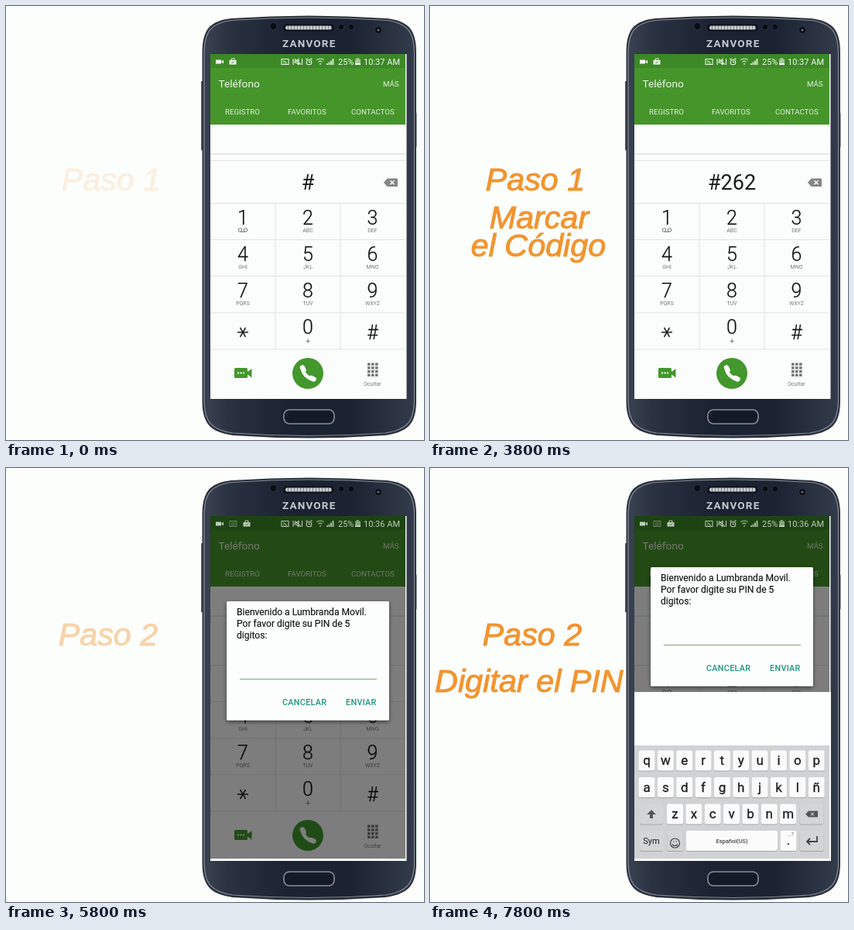
Animation of 540x560 px, one loop 8000 ms. Source, as an HTML page:

```html
<!DOCTYPE html>
<html lang="es">
<head>
<meta charset="utf-8">
<title>Marcar el código</title>
<style>
html, body { margin: 0; width: 100%; height: 100%; overflow: hidden; background: #fcfefc; }
svg { display: block; width: 100vw; height: 100vh; font-family: Roboto, sans-serif; }
.mid { text-anchor: middle; }
.end { text-anchor: end; }
.step { font: italic 41.3px "Liberation Sans", Arial, sans-serif; fill: #f2942f; stroke: #f2942f; stroke-width: 1; text-anchor: middle; }
.number { font-size: 27px; fill: #1c1c1c; text-anchor: middle; }
.tab { font-size: 9.7px; fill: #e3f1dd; }
.grid { stroke: #dfe3e2; }
.digit { font-size: 25px; font-weight: 300; fill: #111; stroke: #111; stroke-width: .25; text-anchor: middle; }
.hint { font-size: 7px; fill: #777; text-anchor: middle; }
.status { font-size: 11px; fill: #f4f8f2; }
.message { font-size: 12.1px; fill: #111; stroke: #111; stroke-width: .15; }
.action { font-size: 10.8px; font-weight: 500; letter-spacing: .3px; fill: #1d9580; }
.key { font-size: 17px; fill: #1c1c1c; stroke: #1c1c1c; stroke-width: .3; text-anchor: middle; }

/* Everything advances on a 200 ms grid; the small lead keeps clear of its edges. */
.a { animation: 8s step-end -50ms infinite; }
.paso1 { animation-name: paso1; }
.marcar { animation-name: marcar; }
.paso2 { animation-name: paso2; }
.digitar { animation-name: digitar; }
.n1 { animation-name: n1; }
.n2 { animation-name: n2; }
.n3 { animation-name: n3; }
.n4 { animation-name: n4; }
.dialing { animation-name: dialing; }
.after { animation-name: after; }
.sliding { animation-name: sliding; }
.dim { animation-name: dim; }
.shift { animation-name: shift; }
.fade { animation-name: fade; }
.running { animation-name: running; }
.pin { animation-name: pin; }
.bag { animation-name: bag; }
.field { animation-name: field; }
.band { animation-name: band; }
.keyboard { animation-name: keyboard; }
.spin { animation-name: spin; animation-timing-function: steps(40); transform-origin: 318px 292px; }

@keyframes paso1 { 0% { opacity: .14; animation-timing-function: steps(6) } 15% { opacity: 1 } 50% { opacity: .5 } 52.5%, 100% { opacity: 0 } }
@keyframes marcar { 0% { opacity: 0 } 15% { opacity: 0; animation-timing-function: steps(7) } 32.5% { opacity: 1 } 50% { opacity: .5 } 52.5%, 100% { opacity: 0 } }
@keyframes paso2 { 0% { opacity: 0 } 67.5% { opacity: 0; animation-timing-function: steps(5) } 80%, 100% { opacity: 1 } }
@keyframes digitar { 0% { opacity: 0 } 77.5% { opacity: 0; animation-timing-function: steps(7) } 95%, 100% { opacity: 1 } }
@keyframes n1 { 0% { opacity: 1 } 5%, 100% { opacity: 0 } }
@keyframes n2 { 0% { opacity: 0 } 5% { opacity: 1 } 12.5%, 100% { opacity: 0 } }
@keyframes n3 { 0% { opacity: 0 } 12.5% { opacity: 1 } 37.5%, 100% { opacity: 0 } }
@keyframes n4 { 0% { opacity: 0 } 37.5% { opacity: 1 } 52.5%, 100% { opacity: 0 } }
@keyframes dialing { 0% { opacity: 1 } 52.5%, 100% { opacity: 0 } }
@keyframes after { 0% { opacity: 0 } 52.5%, 100% { opacity: 1 } }
@keyframes sliding { 0% { opacity: 0 } 52.5% { opacity: 1 } 57.5%, 100% { opacity: 0 } }
@keyframes dim { 0% { opacity: 0 } 57.5% { opacity: .33 } 72.5%, 100% { opacity: .5 } }
@keyframes shift { 0% { transform: none } 52.5% { transform: translateX(1.8px) } 72.5%, 100% { transform: none } }
@keyframes fade { 0% { opacity: 1 } 72.5%, 100% { opacity: .75 } }
@keyframes running { 0% { opacity: 0 } 57.5% { opacity: 1 } 72.5%, 100% { opacity: 0 } }
@keyframes pin { 0% { opacity: 0; transform: none } 72.5% { opacity: 1; transform: none } 92.5%, 100% { opacity: 1; transform: translateY(-44px) } }
@keyframes bag { 0% { transform: none } 72.5%, 100% { transform: translateX(18px) } }
@keyframes field { 0% { opacity: 0 } 72.5%, 100% { opacity: 1 } }
@keyframes band { 0% { opacity: 0 } 92.5%, 100% { opacity: 1 } }
@keyframes keyboard { 0% { transform: translateY(152px) } 87.5% { transform: translateY(60px) } 90%, 100% { transform: none } }
@keyframes spin { to { transform: rotate(1800deg) } }
</style>
</head>
<body>
<svg viewBox="0 0 540 560">
  <defs>
    <linearGradient id="shell">
      <stop stop-color="#3a4352"/><stop offset=".12" stop-color="#2a3242"/><stop offset=".4" stop-color="#1b2231"/>
      <stop offset=".7" stop-color="#1b2231"/><stop offset="1" stop-color="#333c4b"/>
    </linearGradient>
    <pattern id="mesh" width="4" height="4" patternUnits="userSpaceOnUse">
      <rect width="4" height="4" fill="#c9ccd0"/><path d="M0 0V4" stroke="#5b5f68" stroke-width="1.4"/>
    </pattern>
    <filter id="shadow" x="-10%" y="-10%" width="120%" height="130%">
      <feDropShadow dx="0" dy="2" stdDeviation="2.5" flood-opacity=".55"/>
    </filter>
    <clipPath id="screen"><rect x="264" y="62" width="253.5" height="445"/></clipPath>
  </defs>

  <g class="a paso1"><text class="step" x="136" y="238">Paso 1</text></g>
  <g class="a marcar">
    <text class="step" x="141" y="287">Marcar</text>
    <text class="step" x="140" y="323">el Código</text>
  </g>
  <g class="a paso2"><text class="step" x="132" y="229">Paso 2</text></g>

  <g id="phone">
    <path d="M253 97V186M529.5 138V182" stroke="#4d535f" stroke-width="2"/>
    <path d="M254.5 60C254.5 31 264 20 291 17Q391 10 492 17C519 20 529 31 529 60V510C529 539 518 549 490 553Q391 560 293 553C265 549 254.5 539 254.5 510Z" fill="url(#shell)" stroke="#2c313b" stroke-width="2"/>
    <path d="M256 62C256 33 265 22 291 18.500Q391 11.500 492 18.500C518 22 527.500 33 527.500 62V508C527.500 537 517 547 490 551Q391 558 293 551C266 547 256 537 256 508Z" fill="none" stroke="#858b95" stroke-width="1.2"/>
    <rect x="358" y="23.5" width="66" height="9" rx="4.5" fill="#0d111b"/>
    <rect x="361" y="25.5" width="60" height="5" rx="2.5" fill="url(#mesh)"/>
    <g fill="#080b12" stroke="#39435a" stroke-width=".7">
      <circle cx="345.5" cy="26" r="4.5"/><circle cx="433" cy="27" r="4"/>
      <circle cx="446" cy="27" r="4"/><circle cx="481" cy="31" r="4.5"/>
    </g>
    <circle cx="481" cy="31" r="1.5" fill="#6d7280"/>
    <text class="mid" x="391.7" y="52.5" font-size="13.5" font-weight="700" letter-spacing="1.2" fill="#c5c8cf">ZANVORE</text>
    <rect x="359" y="521" width="65" height="18" rx="7" fill="#151a27" stroke="#8a8e97" stroke-width="1.6"/>
  </g>

  <g clip-path="url(#screen)">
    <rect x="264" y="62" width="254" height="446" fill="#fbfcfc"/>
    <rect x="264" y="62" width="252" height="91" fill="#46952b"/>
    <rect x="264" y="62" width="252" height="18" fill="#3c8826"/>
    <g class="a shift">
      <text x="274.5" y="105" font-size="13.7" fill="#f0f7ec">Teléfono</text>
      <text class="tab end" x="507.5" y="103.5">MÁS</text>
      <text class="tab" x="283" y="139.5">REGISTRO</text>
      <text class="tab" x="364" y="139.5">FAVORITOS</text>
      <text class="tab" x="446" y="139.5">CONTACTOS</text>
    </g>
    <path class="grid" d="M264 191H516" stroke-width="1.5"/>
    <g id="keypad"></g>

    <g class="a dialing">
      <path class="grid" d="M264 199.5H516"/>
      <g id="erase">
        <path d="M488 227.7L492.5 222.500H506V233H492.5Z" fill="#858585"/>
        <path d="M496.5 225.2l5 5m0-5l-5 5" stroke="#fff" stroke-width="1.4"/>
      </g>
    </g>
    <text class="a number n1" x="390" y="237">#</text>
    <text class="a number n2" x="390" y="237">#2</text>
    <text class="a number n3" x="390" y="237">#26</text>
    <text class="a number n4" x="390" y="237">#262</text>
    <g class="a sliding">
      <rect x="264" y="62" width="252" height="130" opacity=".32"/>
      <path class="grid" d="M264 211.5H516"/>
      <use href="#erase" y="12"/>
    </g>
    <rect class="a dim" x="264" y="62" width="252" height="442"/>

    <g class="a fade"><g class="a shift status">
      <path d="M271 69.500h7v5h-7zM278 72l3-2.500v5z"/>
      <g class="a bag">
        <path d="M288.500 70h9v5.500h-9z"/>
        <path d="M291 70v-2h4v2" fill="none" stroke="#f4f8f2"/>
        <path d="M291 72.500l1.500 1.500 2.500-2.500" fill="none" stroke="#2d701b"/>
      </g>
      <g class="a field" fill="none" stroke="#b9c6b4">
        <path d="M289 68.500h9v7h-9zM291 71h5.500M291 73.500h5.500" stroke-dasharray="1.5 .7"/>
      </g>
      <g fill="none" stroke="#eaf2e6" stroke-width="1.1">
        <path d="M356 68.500h9v7h-9zM358 71q4 0 4 4M358 73.500h1.500"/>
        <path d="M371 68v8M373 71h2l3-2.500v7l-3-2.500h-2zM373 68.500l8 7M382.500 68v8"/>
        <circle cx="391.5" cy="72.5" r="3.3"/>
        <path d="M391.500 70.500v2h2M387.500 69l2-1.500M395.500 69l-2-1.500"/>
        <path d="M401.500 69.500q4.500-3 9 0M403.500 72q2.500-2 5 0M406 73.500V76"/>
        <path d="M415 76v-2M417.500 76v-3.500M420 76v-5.500M422.500 76v-8" stroke-width="1.7"/>
      </g>
      <text x="429" y="76">25%</text>
      <path d="M453 67h3v1.500h2V76h-7v-7.500h2z" fill="#a9c59f"/>
      <path d="M451 74h7v2h-7z"/>
      <g class="a dialing"><text class="end" x="509" y="76">10:37 AM</text></g>
      <g class="a after"><text class="end" x="509" y="76">10:36 AM</text></g>
    </g></g>

    <rect class="a band" x="264" y="289" width="254" height="219" fill="#fdfefe"/>

    <g class="a running">
      <rect x="285" y="260" width="210" height="65.5" rx="1.5" fill="#fcfdfd" filter="url(#shadow)"/>
      <g class="a spin">
        <circle cx="318" cy="292" r="14" fill="none" stroke="#35966c" stroke-width="2.8" stroke-dasharray="40 3.98" transform="rotate(60 318 292)"/>
      </g>
      <text class="message" x="346" y="288.5">Código USSD en</text>
      <text class="message" x="346" y="305">ejecución…</text>
    </g>

    <g class="a pin">
      <rect x="285" y="172" width="210" height="153.5" rx="1.5" fill="#fcfdfd" filter="url(#shadow)"/>
      <text class="message" x="298" y="190">Bienvenido a Lumbranda Movil.</text>
      <text class="message" x="298" y="205">Por favor digite su PIN de 5</text>
      <text class="message" x="298" y="220">digitos:</text>
      <path d="M302 272.500H479" stroke="#9aba93" stroke-width="1.3"/>
      <text class="action" x="357" y="306">CANCELAR</text>
      <text class="action" x="439" y="306">ENVIAR</text>
    </g>

    <g class="a keyboard" id="keyboard">
      <rect x="264" y="358" width="252" height="146" fill="#d0d2d4"/>
    </g>
  </g>

  <g class="a digitar"><text class="step" x="128" y="289">Digitar el PIN</text></g>
</svg>
<script>
const add = (id, markup) => document.getElementById(id).insertAdjacentHTML('beforeend', markup);
const text = (kind, x, y, label, extra = '') => `<text class="${kind}" x="${x}" y="${y}" ${extra}>${label}</text>`;

// Dial pad
const columns = [306, 390, 473.5];
const hints = ['', 'ABC', 'DEF', 'GHI', 'JKL', 'MNO', 'PQRS', 'TUV', 'WXYZ'];
let pad = '<path class="grid" d="M348 254V443M432 254V443';
for (let row = 0; row < 5; row++) pad += `M264 ${254.5 + row * 47.1}H516`;
pad += '"/>';
hints.forEach((hint, i) => {
  const x = columns[i % 3], y = 281.5 + Math.floor(i / 3) * 47.2;
  pad += text('digit', x, y, i + 1) + text('hint', x, y + 10.5, hint);
});
pad += text('digit', 390, 422.5, 0) + text('hint', 390, 435.5, '+', 'style="font-size:11px"') + text('digit', 473.5, 429.5, '#');
pad += `<path d="M299 421h14M302.500 415l7 12M309.500 415l-7 12" stroke="#222" stroke-width="1.5"/>
  <g fill="none" stroke="#777"><circle cx="302.5" cy="289" r="2.3"/><circle cx="309.5" cy="289" r="2.3"/><path d="M302.500 291.300h7"/></g>
  <g fill="#43972c"><rect x="295" y="467" width="17" height="13" rx="1.5"/><path d="M312 472l5.500-4v11.500l-5.500-4z"/></g>
  <path d="M299 473.500h9" stroke="#fff" stroke-width="2" stroke-dasharray="2 1.5"/>
  <circle cx="390" cy="474" r="20" fill="#43972c"/>
  <g fill="none" stroke="#fff" stroke-linecap="round"><path d="M383 468Q385 479 396 481" stroke-width="4.5"/>
  <path d="M383 466.500l1.500 3.500M394 480l3.500 1.500" stroke-width="6.5"/></g>`;
for (let i = 0; i < 12; i++)
  pad += `<rect x="${467 + i % 3 * 5}" y="${460.5 + Math.floor(i / 3) * 4.7}" width="3.6" height="3.4" fill="#777"/>`;
add('keypad', pad + text('hint', 473.5, 490, 'Ocultar'));

// Text keyboard
const cap = (x, y, width, fill = '#fbfbfb') =>
  `<rect x="${x - width / 2}" y="${y - 12}" width="${width}" height="26" rx="2.5" fill="#a4a6a8"/>
   <rect x="${x - width / 2}" y="${y - 13}" width="${width}" height="26" rx="2.5" fill="${fill}"/>`;
const rowOf = (letters, start, y) => [...letters].map((letter, i) => {
  const x = start + i * 24.35;
  return cap(x, y, 21) + text('key', x, y + 5.5, letter);
}).join('');
const grey = '#d3d5d6';
add('keyboard', rowOf('qwertyuiop', 280, 377.5) + rowOf('asdfghjklñ', 280, 412) + rowOf('zxcvbnm', 316.5, 446.5)
  + cap(286, 446.5, 30, grey) + cap(493, 446.5, 31, grey) + cap(286, 481, 30, grey) + cap(317, 481, 21, grey)
  + cap(390, 481, 118) + cap(463, 481, 21) + cap(493, 481, 31, grey)
  + text('key', 286, 485, 'Sym', 'style="font-size:11px;stroke:none"')
  + text('key', 390, 484, 'Español(US)', 'style="font-size:7.5px;stroke:none"')
  + text('key', 463, 486, '.') + text('hint', 466, 475, '…?')
  + `<path d="M286 441l6 6h-4v5h-4v-5h-4z" fill="#555"/>
     <path d="M485 446.500l4-4h12v8h-12z" fill="#555"/><path d="M492 444.500l4 4m0-4l-4 4" stroke="#fff"/>
     <g fill="none" stroke="#444" stroke-width="1.2"><circle cx="316.5" cy="484" r="6"/><path d="M313 485.500q3.500 4 7 0M314 482h1.500M317.500 482h1.500"/>
     <path d="M500 475v7h-13m4-4l-4 4 4 4" stroke-width="1.8"/></g>`);
</script>
</body>
</html>
```
